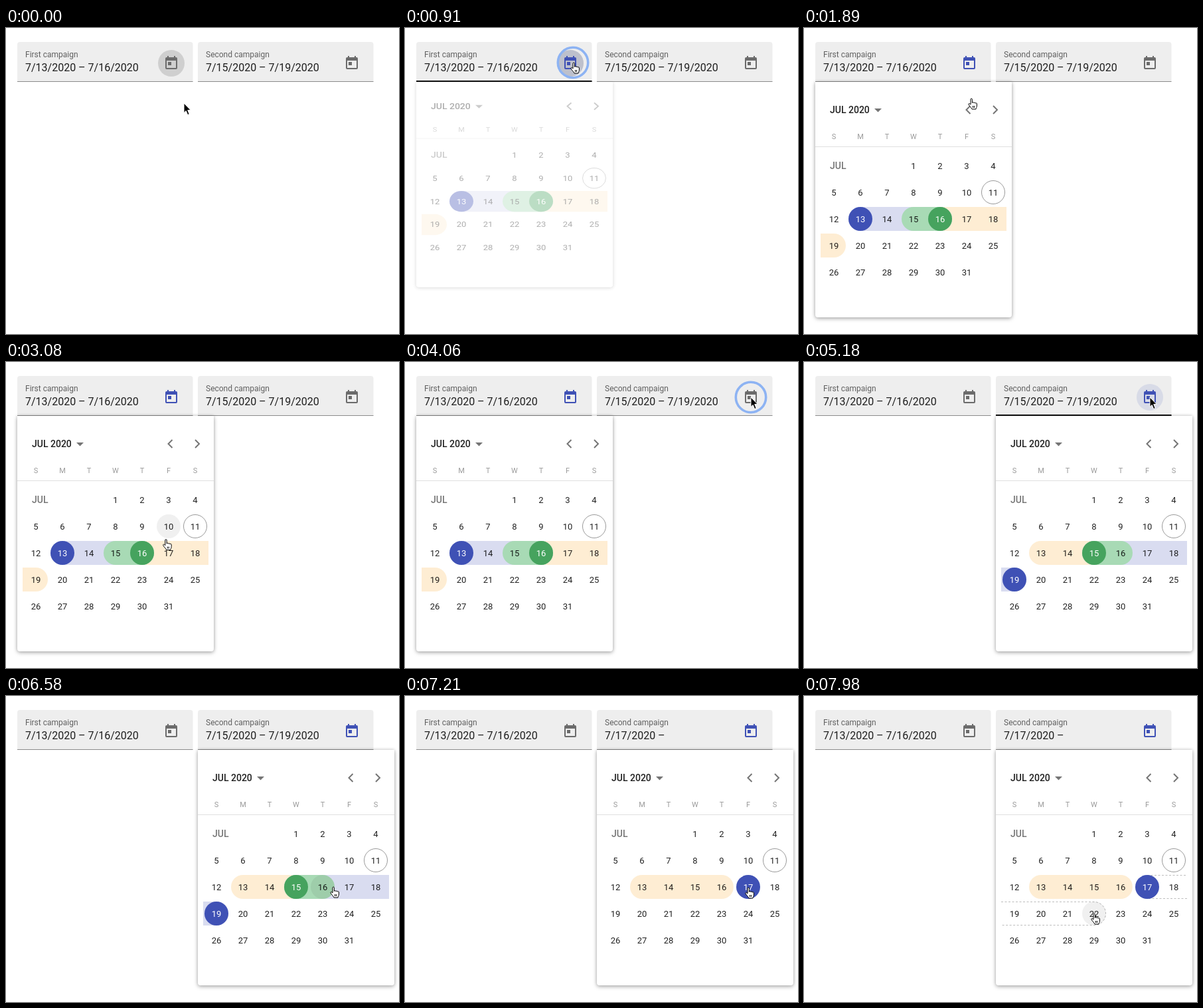
Animation, 592 px wide and 460 px high, one loop 8 s. Source, as an HTML page:

```html
<!DOCTYPE html>
<html lang="en">
<head>
<meta charset="utf-8">
<title>Date range comparison</title>
<style>
  html, body { margin: 0; width: 100%; height: 100%; overflow: hidden; background: #fff; }
  svg { display: block; font-family: Roboto, sans-serif; fill: rgba(0,0,0,.87); }
  .label { font-size: 12px; fill: rgba(0,0,0,.6); }
  .value { font-size: 16px; }
  .title { font-size: 14px; font-weight: 500; }
  .muted { fill: rgba(0,0,0,.54); }
  .mid { text-anchor: middle; font-size: 13px; }
  .weekday { text-anchor: middle; font-size: 11px; fill: rgba(0,0,0,.4); }
  .chevron { fill: none; stroke: rgba(0,0,0,.54); stroke-width: 2; }
  .preview { fill: none; stroke: rgba(0,0,0,.26); stroke-dasharray: 3 2.5; }
  .panel { fill: #fff; filter: drop-shadow(0 2px 3px rgba(0,0,0,.26)) drop-shadow(0 0 2px rgba(0,0,0,.18)); }
</style>
</head>
<body>
<svg id="stage" width="592" height="460" viewBox="0 0 592 460"></svg>
<script>
const LOOP = 8000, STEP = 70;
const BLUE = '#3f51b5', GREEN = '#46a35e';
const FIELDS = [17, 289];
const PICK_TIME = 7000;
const CLICKS = [[770, 980], [3990, 4200], [4690, 4900], [6860, 7000]];

// time, x, y, and whether the stretch leading there is linear
const PATH = [
  [0, 268, 113], [490, 254, 52], [1540, 254, 52], [1680, 254, 64, 1],
  [1890, 252, 106, 1], [2170, 223, 258, 1], [2310, 214, 287, 1], [2940, 214, 287],
  [3710, 521, 53], [5670, 521, 53], [6510, 493, 287], [6580, 493, 287],
  [6860, 517, 288], [7350, 517, 288], [7560, 512, 340], [7630, 512, 340], [7980, 437, 327]
];

const clamp = v => Math.min(1, Math.max(0, v));
const ramp = (t, a, b) => clamp((t - a) / (b - a));
const between = (t, a, b) => t >= a && t < b;
const text = (x, y, cls, str, extra = '') => `<text x="${x}" y="${y}" class="${cls}" ${extra}>${str}</text>`;
const circle = (x, y, r, fill, extra = '') => `<circle cx="${x}" cy="${y}" r="${r}" fill="${fill}" ${extra}/>`;

function cursorAt(t) {
  const i = PATH.findIndex(k => k[0] > t);
  if (i < 0) return PATH[PATH.length - 1].slice(1, 3);
  const a = PATH[i - 1], b = PATH[i];
  let p = ramp(t, a[0], b[0]);
  if (!b[3]) p = p * p * (3 - 2 * p);
  return [1, 2].map(n => a[n] + (b[n] - a[n]) * p);
}

// cubic-bezier(0, 0, .2, 1)
function decelerate(x) {
  let lo = 0, hi = 1;
  for (let i = 0; i < 20; i++) {
    const s = (lo + hi) / 2;
    if (.6 * (1 - s) * s * s + s ** 3 < x) lo = s; else hi = s;
  }
  return 3 * (1 - lo) * lo * lo + lo ** 3;
}

const rowOf = d => Math.floor((d + 2) / 7);
const cellX = d => 28 + 40 * ((d + 2) % 7);
const cellY = d => 126 + 40 * rowOf(d);

function dayAt(x, y, left) {
  const col = Math.floor((x - left - 8) / 40), row = Math.floor((y - 187) / 40);
  const d = row * 7 + col - 2;
  return col >= 0 && col < 7 && row >= 0 && d >= 1 && d <= 31 ? d : 0;
}

// Splits a span of days into one piece per week
function weeks(from, to, draw) {
  let out = '';
  for (let r = rowOf(from); r <= rowOf(to); r++) {
    const first = Math.max(from, r * 7 - 2), last = Math.min(to, r * 7 + 4);
    out += draw(first, last, first === from, last === to);
  }
  return out;
}

const band = (from, to, fill) => weeks(from, to, (a, b, start, end) => {
  const l = cellX(a), r = cellX(b), y = cellY(a) - 18;
  const right = end ? 'a18 18 0 0 1 0 36' : 'h20v36h-20';
  const left = start ? 'a18 18 0 0 1 0-36' : 'h-20v-36h20';
  return `<path d="M${l} ${y}H${r}${right}H${l}${left}z" fill="${fill}"/>`;
});

const preview = (from, to) => weeks(from, to, (a, b, start, end) => {
  const l = cellX(a) - (start ? 0 : 20), r = cellX(b), y = cellY(a) - 17.5;
  const right = end ? 'a17.5 17.5 0 0 1 0 35' : 'h20m0 35h-20';
  return `<path class="preview" d="M${l} ${y}H${r}${right}H${l}"/>`;
});

function calendar(left, range, other, hover, show, scale) {
  const [s, e] = range, [cs, ce] = other;
  let out = `<g opacity="${show}" transform="translate(${left} 81) scale(1 ${scale})">
    <path class="panel" d="M0 0H296V350a4 4 0 0 1-4 4H4a4 4 0 0 1-4-4z"/>
    <path class="muted" d="M89 40h11l-5.5 5.5z"/>
    <path class="chevron" d="M233.5 36l-6 6 6 6M268 36l6 6-6 6"/>
    <path d="M0 97.5H296" stroke="rgba(0,0,0,.12)"/>`;
  out += text(22, 47, 'title', 'JUL 2020') + text(22, 131, 'title muted', 'JUL');
  [...'SMTWTFS'].forEach((c, i) => out += text(28 + 40 * i, 86, 'weekday', c));
  out += band(cs, ce, '#feedd3');
  if (e) {
    out += band(s, e, '#d9dcf0');
    out += band(Math.max(s, cs), Math.min(e, ce), '#a8dab5');
  } else if (hover > s) {
    out += preview(s, hover);
  }
  for (let d = 1; d <= 31; d++) {
    const x = cellX(d), y = cellY(d), picked = d === s || d === e;
    if (picked) out += circle(x, y, 18, d >= cs && d <= ce ? GREEN : BLUE);
    else if (d === hover) out += circle(x, y, 18, 'rgba(0,0,0,.06)');
    if (d === 11) out += circle(x, y, 17.5, 'none', 'stroke="rgba(0,0,0,.4)"');
    out += text(x, y + 4.6, 'mid', d, picked ? 'fill="#fff"' : '');
  }
  return out + '</g>';
}

function field(left, label, value, active, line, halo) {
  return `<path d="M${left} 81V25a4 4 0 0 1 4-4h256.500a4 4 0 0 1 4 4V81z" fill="#eee"/>
    <rect x="${left}" y="80" width="264.5" height="1" fill="#8a8a8a"/>
    <rect x="${left}" y="79" width="264.5" height="2" fill="#111" opacity="${line}"/>` +
    text(left + 12, 44, 'label', label) + text(left + 12, 65, 'value', value) + halo +
    `<path transform="translate(${left + 220} 41)" fill="${active ? BLUE : '#6b6b6b'}" fill-rule="evenodd"
      d="M19 3h-1V1h-2v2H8V1H6v2H5a2 2 0 0 0-2 2v14a2 2 0 0 0 2 2h14a2 2 0 0 0 2-2V5a2 2 0 0 0-2-2zM19 19H5V8h14zM7 10h5v5H7z"/>`;
}

function pointer(x, y, hand) {
  return hand
    ? `<path transform="translate(${x - 5} ${y - .5})" fill="#fff" stroke="#000" stroke-linejoin="round"
        d="M4 1.700c0-1.500 2.400-1.500 2.400 0V7c.3-1.300 2.300-1.200 2.400.2.3-1 2.200-.9 2.300.5.500-.9 2.300-.6 2.300.8V11.500c0 2.500-1.400 3-1.400 5H6C5 14 2.200 12 1 9.500c-.6-1.300 1-2 2-.9l1 1zM7.500 11.500v3M9.500 11.500v3"/>`
    : `<path transform="translate(${x} ${y})" fill="#000" stroke="#fff" stroke-linejoin="round"
        d="M0 0V14.500L3.200 11.500 5.700 17.600 8.200 16.500 5.700 10.600H10.200z"/>`;
}

function render(t) {
  const [x, y] = cursorAt(t);
  const grow = [895, 4815].map(start => decelerate(ramp(t, start, start + 120)));
  const show = [grow[0] * (1 - ramp(t, 4165, 4265)), grow[1]];
  const open = show.findIndex(v => v > .8);
  const hover = open < 0 ? 0 : dayAt(x, y, FIELDS[open]);
  const near = (cx, cy) => Math.hypot(x - cx, y - cy) < 20;
  const hand = open < 0
    ? FIELDS.some(left => near(left + 232, 53))
    : hover || [230, 271].some(dx => near(FIELDS[open] + dx, 123));

  const grey = t < 1400 ? 1 - ramp(t, 1050, 1400) : +between(t, 4270, 4760);
  const tint = ramp(t, 770, 840) * (1 - ramp(t, 1050, 1400));
  const tint2 = ramp(t, 4690, 4830) * (1 - ramp(t, 5180, 5460));
  const halo = (left, fill, opacity) => circle(left + 232, 53, 20, fill, `opacity="${opacity}"`);
  const lines = [
    ramp(t, 280, 420) - ramp(t, 1050, 1470),
    ramp(t, 4270, 4410) - ramp(t, 5180, 5460)
  ];
  const picked = t >= PICK_TIME;

  let out = field(FIELDS[0], 'First campaign', '7/13/2020 – 7/16/2020', between(t, 880, 4200), lines[0],
    halo(FIELDS[0], '#000', .13 * grey) + halo(FIELDS[0], BLUE, .12 * tint));
  out += field(FIELDS[1], 'Second campaign', picked ? '7/17/2020 –' : '7/15/2020 – 7/19/2020', t >= 4800, lines[1],
    halo(FIELDS[1], BLUE, .12 * tint2));

  const ranges = [[13, 16], picked ? [17, 0] : [15, 19]];
  const others = [[15, 19], [13, 16]];
  FIELDS.forEach((left, i) => {
    if (show[i] > 0) out += calendar(left, ranges[i], others[i], i === open ? hover : 0, show[i], .8 + .2 * grow[i]);
  });
  if (CLICKS.some(([a, b]) => between(t, a, b))) {
    out += circle(x - (hand ? 1 : 0), y, 22.7, 'none', 'stroke="#8db3f3" stroke-width="3.6"');
  }
  stage.innerHTML = out + pointer(x, y, hand);
}

const stage = document.getElementById('stage');
const begin = performance.now();
let shown = -1;
function tick() {
  const t = Math.floor((performance.now() - begin) % LOOP / STEP) * STEP;
  if (t !== shown) render(shown = t);
  requestAnimationFrame(tick);
}
tick();
</script>
</body>
</html>
```
